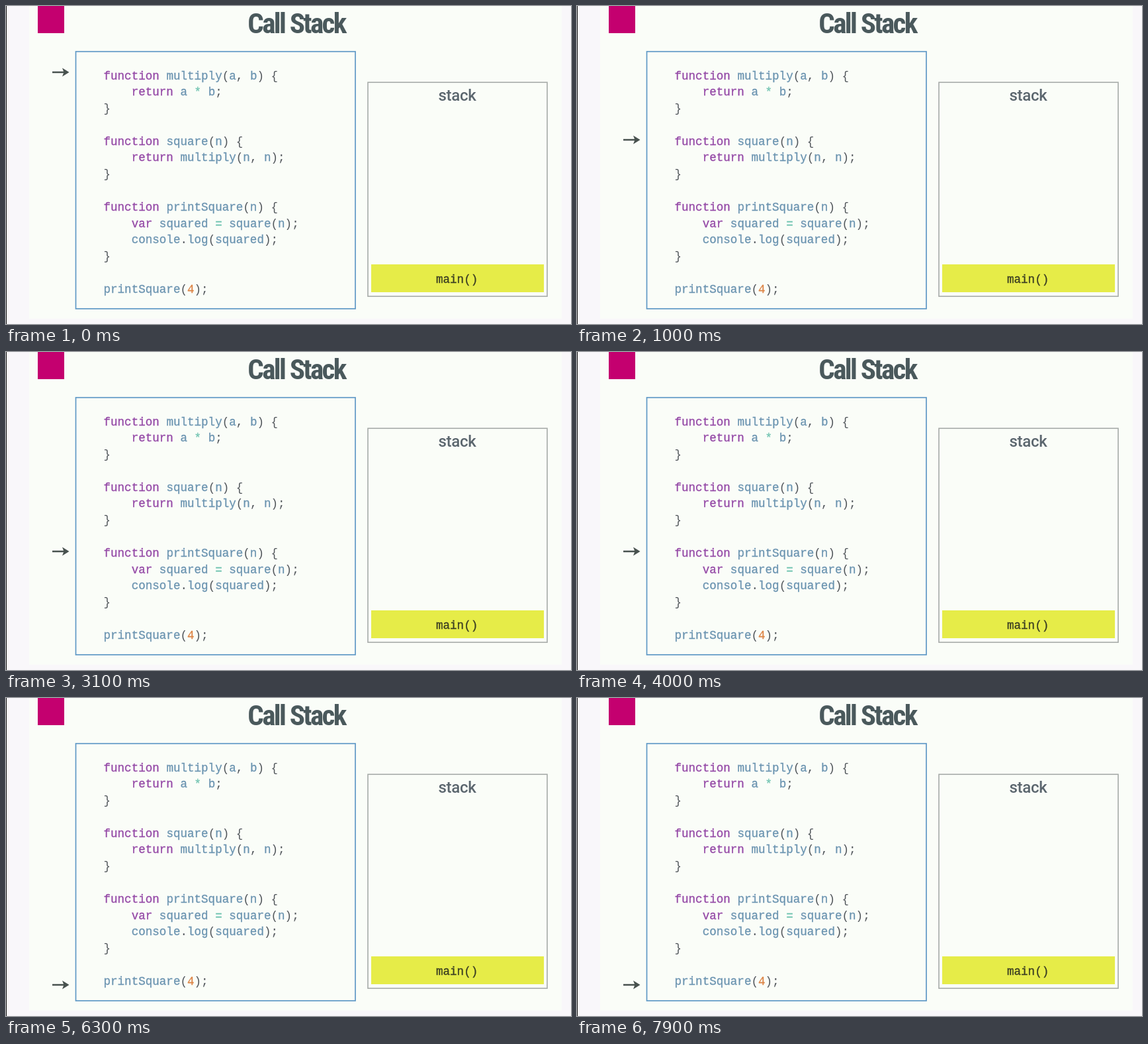
An HTML page for the animation above (8 s loop, 854 by 480 pixels).

```html
<!DOCTYPE html>
<html lang="en">
<head>
<meta charset="utf-8">
<title>Call Stack</title>
<style>
  html, body { margin: 0; width: 100%; height: 100%; overflow: hidden; background: #f9f7fa; }
  svg { display: block; width: 854px; height: 480px; }
  text { white-space: pre; }
  .head { font-family: "Roboto Condensed", Roboto, sans-serif; fill: #4a595c; text-anchor: middle; }
  .title { font-size: 43px; font-weight: 600; font-stretch: 75%; letter-spacing: -2.6px; }
  .label { font: 500 24px Roboto, sans-serif; letter-spacing: -.3px; fill: #5b666e; }
  .code { font: 17.57px "Liberation Mono", monospace; fill: #50555a; stroke-width: .3px; }
  .key { fill: #9448a6; stroke: #9448a6; }
  .name { fill: #6a93b0; stroke: #6a93b0; }
  .op { fill: #6fc3b0; stroke: #6fc3b0; }
  .num { fill: #dd8648; stroke: #dd8648; }
</style>
</head>
<body>
<svg viewBox="0 0 854 480">
  <rect x="35" width="805" height="472" fill="#fafdf8"/>
  <rect width="1" height="480" fill="#111"/>
  <rect x="48" width="40" height="41" fill="#c4006f"/>
  <text class="head title" x="439" y="40.5">Call Stack</text>

  <rect x="105.5" y="68.75" width="422.5" height="388.25" fill="none" stroke="#5f98c6" stroke-width="1.7"/>
  <g id="code" class="code"></g>

  <rect x="547" y="115.25" width="271" height="323" fill="none" stroke="#a6aaa8" stroke-width="1.6"/>
  <text class="head label" x="682" y="143">stack</text>
  <rect x="552" y="390" width="261" height="42" fill="#e6ec48"/>
  <text class="code" x="650" y="418" style="fill:#3a3d22;stroke:#3a3d22">main()</text>

  <path id="arrow" d="M70-1.2H87L85-6.5 95.5 0 85 6.5 87 1.2H70z" fill="#48524f"/>
</svg>
<script>
const source = `function multiply(a, b) {
    return a * b;
}

function square(n) {
    return multiply(n, n);
}

function printSquare(n) {
    var squared = square(n);
    console.log(squared);
}

printSquare(4);`;

const kind = word =>
  /^(function|return|var)$/.test(word) ? 'key' :
  /^\d/.test(word) ? 'num' :
  /^\w/.test(word) ? 'name' : 'op';

const paint = line => line.replace(/\w+|[*=]/g, word =>
  `<tspan class="${kind(word)}">${word}</tspan>`);

document.getElementById('code').innerHTML = source.split('\n').map((line, i) =>
  `<text x="147.5" y="${110.5 + i * 24.78}">${paint(line)}</text>`).join('');

// Each move: start in ms, start and end height.
const moves = [
  [150, 100, 202],
  [1150, 202, 301],
  [4480, 301, 433]
];
const span = 600;
const ease = p => (1 - Math.cos(Math.PI * p)) / 2;
const clamp = p => Math.min(1, Math.max(0, p));

const height = t => moves.reduce((y, [start, a, b]) =>
  y + (b - a) * ease(clamp((t - start) / span)), moves[0][1]);

const arrow = document.getElementById('arrow');
const begin = performance.now();
function draw(now) {
  const t = Math.max(0, now - begin) % 8000;
  arrow.setAttribute('transform', `translate(0 ${height(t).toFixed(2)})`);
  requestAnimationFrame(draw);
}
draw(begin);
</script>
</body>
</html>
```
